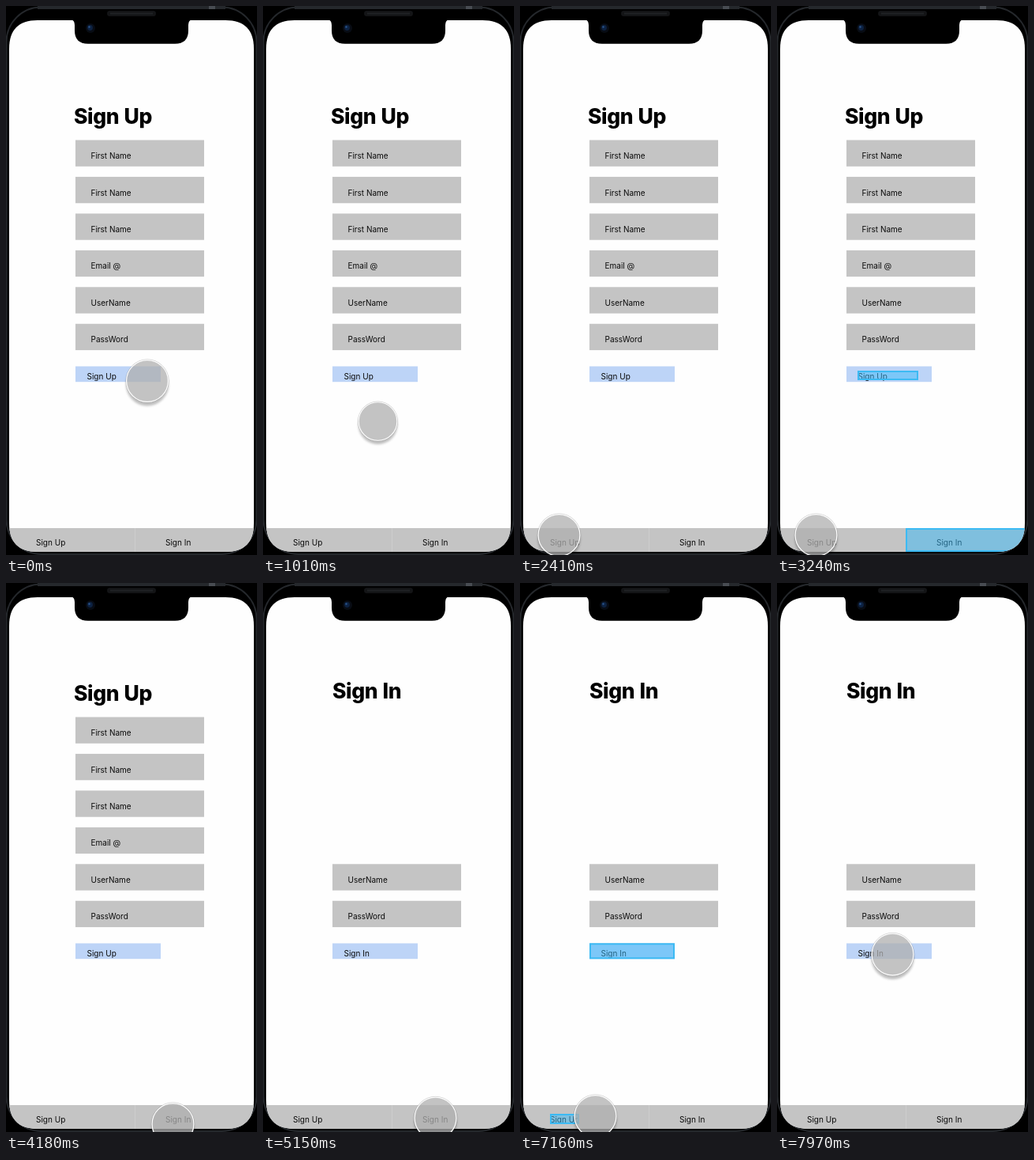
An HTML page that plays this animation: 318 by 694 pixels, repeating every 8 s.

```html
<!DOCTYPE html>
<html lang="en">
<head>
<meta charset="utf-8">
<title>Sign up prototype</title>
<style>
  html, body { margin: 0; width: 100%; height: 100%; overflow: hidden; background: #000; }
  svg { display: block; width: 100%; height: 100%; }
  text { font: 10px Inter, "Open Sans", sans-serif; fill: #0a0a0a; white-space: pre; }
  .title { font-size: 26.5px; font-weight: 800; font-optical-sizing: none; letter-spacing: -.4px; word-spacing: 1px; fill: #000; }
  .field { fill: #c4c4c4; }
  .button { fill: #bdd4f7; }
  .hot rect { fill: #3cbcfa; fill-opacity: .5; stroke: #3cbaf3; stroke-width: 2; }
</style>
</head>
<body>
<svg viewBox="0 0 318 694" preserveAspectRatio="none">
  <defs>
    <clipPath id="screen">
      <path d="M4 54C4 30 16 18 40 18H278C302 18 314 30 314 54V654C314 678 302 690 278 690H40C16 690 4 678 4 654Z"/>
    </clipPath>
    <filter id="soft" x="-20%" y="-20%" width="140%" height="140%"><feGaussianBlur stdDeviation="1.8"/></filter>
    <mask id="outside" maskUnits="userSpaceOnUse" x="-40" y="-40" width="80" height="80">
      <rect x="-40" y="-40" width="80" height="80" fill="#fff"/><circle r="27" fill="#000"/>
    </mask>
  </defs>

  <rect width="318" height="694"/>
  <rect x=".5" y="1.5" width="317" height="691.5" rx="44" fill="none" stroke="#25282c" stroke-width="2"/>
  <path d="M40 2H278" stroke="#25282c" stroke-width="4"/>
  <path d="M257 2h8" stroke="#484c52" stroke-width="4"/>

  <g clip-path="url(#screen)">
    <rect width="318" height="694" fill="#fefefe"/>
    <g id="pages"></g>
    <rect class="field" x="4" y="660" width="310" height="31"/>
    <path d="M163.5 660v31" stroke="#cecece"/>
    <text x="38" y="681.8">Sign Up</text>
    <text x="202" y="681.8">Sign In</text>
    <g id="hots"></g>
  </g>

  <path d="M82 17Q87 18 87 24V31Q87 47.7 104 47.7H214Q231 47.7 231 31V24Q231 18 236 17Z"/>
  <rect x="128" y="6" width="62" height="7" rx="3.5" fill="#131416"/>
  <path d="M132 9.5h54" stroke="#202225" stroke-width="2"/>
  <circle cx="107" cy="28" r="6" fill="#080c14"/>
  <circle cx="106.5" cy="27.5" r="3.4" fill="#0d2242"/>
  <circle cx="105.5" cy="26.5" r="1.2" fill="#2b558c"/>

  <g id="cursor">
    <circle cy="4.5" r="27" opacity=".25" filter="url(#soft)" mask="url(#outside)"/>
    <circle r="27" fill="#afafaf" fill-opacity=".75"/>
    <circle r="27.2" fill="none" stroke="#777" stroke-opacity=".4" stroke-width=".8"/>
    <circle r="26.4" fill="none" stroke="#fff" stroke-width="1.2"/>
  </g>
</svg>
<script>
const $ = id => document.getElementById(id);
const LOOP = 8000, REFRESH = 135, SWITCH = 5150;

const rect = (x, y, w, h, cls = '') => `<rect class="${cls}" x="${x}" y="${y}" width="${w}" height="${h}"/>`;
const text = (x, y, s, cls = '') => `<text class="${cls}" x="${x}" y="${y}">${s}</text>`;
const field = (label, row) => {
  const y = 169.5 + row * 46.45;
  return rect(88, y, 163, 33.3, 'field') + text(107.5, y + 23.6, label);
};
const page = (name, x, y, labels) => '<g>' + text(x, y, name, 'title') +
  labels.map((s, i) => field(s, 6 - labels.length + i)).join('') +
  rect(88, 455.5, 108, 19.7, 'button') + text(102.5, 471.8, name) + '</g>';

$('pages').innerHTML =
  page('Sign Up', 86, 148.5, ['First Name', 'First Name', 'First Name', 'Email @', 'UserName', 'PassWord']) +
  page('Sign In', 88, 146, ['UserName', 'PassWord']);
$('hots').innerHTML =
  `<g class="hot">${rect(103, 462, 75, 10)}${rect(164, 661, 152, 28)}</g>` +
  `<g class="hot">${rect(89, 456.3, 106, 18)}${rect(39, 672, 35, 11)}</g>`;

const pages = $('pages').children, hots = $('hots').children;

const home = { x: 179, y: 474 };
const glides = [
  { from: 350, to: 590, x: 145.5, y: 525 },
  { from: 1430, to: 1690, x: 145.5, y: 470 },
  { from: 1800, to: 2350, x: 49.5, y: 669 },
  { from: 3440, to: 4180, x: 211.5, y: 684 },
  { from: 4180, to: 4580, x: 218.5, y: 676.5 },
  { from: 6060, to: 6580, x: 95.5, y: 674 },
  { from: 7390, to: 7960, x: 146.5, y: 469.5 },
];
const taps = [{ down: 1010, up: 1290 }, { down: 2680, up: 2990 }, { down: 4870, up: SWITCH }, { down: 6890, up: 7160 }];

const wakes = [0, 460, 2410, 4180, 6180, ...taps.map(tap => tap.up)];

const clamp = k => Math.min(1, Math.max(0, k));
const ease = k => k * k * (3 - 2 * k);

function refreshTime(t) {
  const wake = Math.max(...wakes.filter(w => w <= t));
  return wake ? wake + Math.floor((t - wake) / REFRESH) * REFRESH : 0;
}

function cursorAt(t) {
  let { x, y } = home;
  for (const g of glides) {
    const k = ease(clamp((t - g.from) / (g.to - g.from)));
    x += (g.x - x) * k;
    y += (g.y - y) * k;
  }
  return [x, y];
}

// Hotspots flash after a missed tap, then fade
function glow(t) {
  const miss = taps.find(({ up }) => up !== SWITCH && t >= up && t < up + 500);
  return miss ? clamp((miss.up + 500 - t) / 200) : 0;
}

function draw(time) {
  const t = refreshTime(time);
  const current = time < SWITCH ? 0 : 1;
  for (const i of [0, 1]) {
    pages[i].setAttribute('visibility', i === current ? 'visible' : 'hidden');
    hots[i].setAttribute('opacity', i === current ? glow(t) : 0);
  }
  const scale = taps.some(({ down, up }) => time >= down && time < up) ? .92 : 1;
  $('cursor').setAttribute('transform', `translate(${cursorAt(t)}) scale(${scale})`);
}

const start = performance.now();
function tick() {
  draw((performance.now() - start) % LOOP);
  requestAnimationFrame(tick);
}
tick();
</script>
</body>
</html>
```
